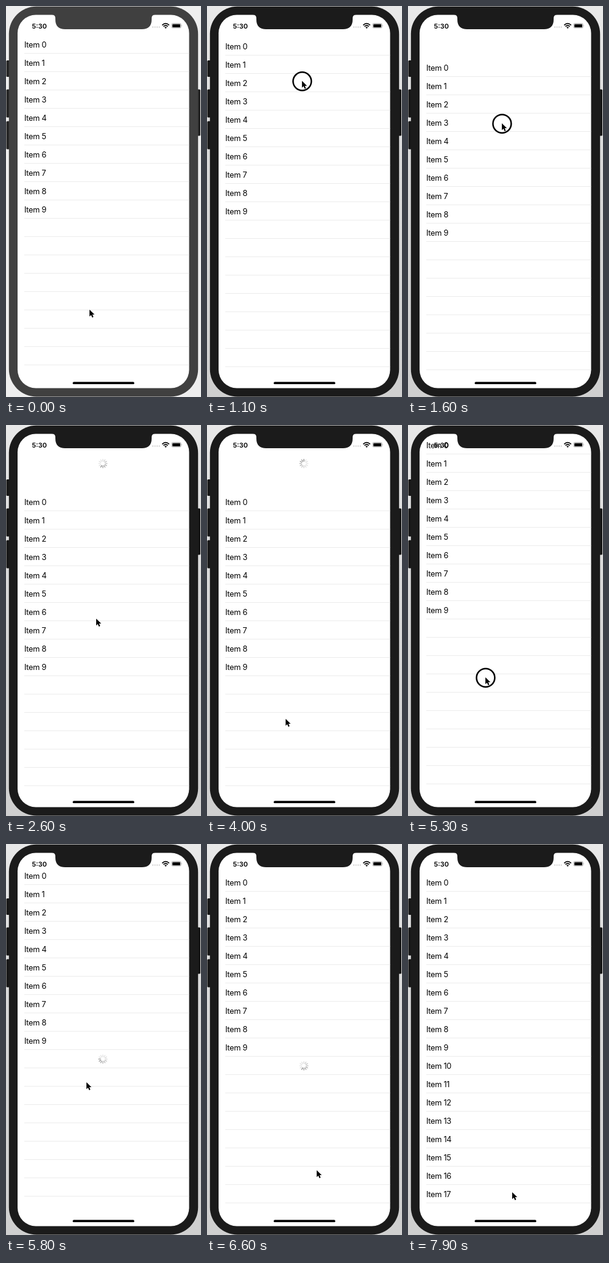
An HTML page for the animation above (8000 ms loop, 320 px wide and 640 px high).

```html
<!DOCTYPE html>
<html lang="en">
<head>
<meta charset="utf-8">
<title>Pull to refresh list</title>
<style>
  html, body { margin: 0; width: 100%; height: 100%; overflow: hidden; background: #eee; }
  svg { display: block; width: 320px; height: 640px; --body: #1b1b1b; --button: #171717; }
  svg.idle { --body: #404040; --button: #242424; }
  .body { fill: var(--body); }
  .button { fill: var(--button); }
  .idle .shade { opacity: 0; }
  text { font-family: Inter, "Liberation Sans", sans-serif; fill: #000; }
  .row { font-size: 12.8px; letter-spacing: -.3px; }
  .clock { font-size: 11px; font-weight: 600; }
  .line { stroke: #ececec; stroke-width: 1; }
</style>
</head>
<body>
<svg id="stage" viewBox="0 0 320 640">
  <defs>
    <clipPath id="screen"><rect x="19" y="14.5" width="281.5" height="611" rx="30"/></clipPath>
    <linearGradient id="shade" x2="0" y2="1">
      <stop offset="0" stop-color="#e8e8e8"/>
      <stop offset=".4" stop-color="#d9d9d9"/>
      <stop offset="1" stop-color="#cfcfcf"/>
    </linearGradient>
  </defs>
  <rect width="320" height="640" fill="#eeeeee"/>
  <rect class="shade" width="320" height="640" fill="url(#shade)"/>
  <g class="button">
    <rect x=".5" y="89" width="6" height="27" rx="1.5"/>
    <rect x=".5" y="136.500" width="6" height="46" rx="1.5"/>
    <rect x=".5" y="188.500" width="6" height="46" rx="1.5"/>
    <rect x="313" y="136.500" width="6" height="76" rx="1.5"/>
  </g>
  <rect class="body" x="4.800" y=".8" width="310.400" height="638.600" rx="45"/>
  <rect x="19" y="14.500" width="281.500" height="611" rx="30" fill="#fff"/>

  <g clip-path="url(#screen)">
    <g id="lines"></g>
    <g id="rows"></g>
    <g id="spinner"></g>
  </g>

  <path class="body" d="M75 14Q81 14.500 81 20V22Q81 38 97 38H223Q239 38 239 22V20Q239 14.500 245 14Z"/>
  <text class="clock" x="42.500" y="36.500">5:30</text>
  <g fill="#c4c4c4">
    <circle cx="241" cy="34.500" r="1"/><circle cx="244.500" cy="34.500" r="1"/>
    <circle cx="248" cy="34.500" r="1"/><circle cx="251.500" cy="34.500" r="1"/>
  </g>
  <g fill="none" stroke="#000" stroke-width="1.700">
    <path d="M256.300 31.300Q262 26 267.700 31.300"/>
    <path d="M258.500 33.500Q262 30.300 265.500 33.500"/>
  </g>
  <path d="M260 35Q262 33.300 264 35L262 37Z"/>
  <rect x="271.700" y="28.500" width="15.600" height="7.600" rx="2.200" fill="#fff" stroke="#999" stroke-width=".8"/>
  <rect x="273" y="29.700" width="13" height="5.200" rx="1"/>
  <path d="M288.500 31V33.600Q289.800 32.300 288.500 31Z" fill="#999"/>
  <rect x="109.500" y="615.300" width="101" height="3.700" rx="1.850"/>

  <g id="pointer">
    <circle id="touch" cx=".4" cy=".8" r="15" fill="#fff" stroke="#000" stroke-width="2.500"/>
    <path d="M0 0V11.200L2.600 8.800L4.500 13L6.500 12.100L4.700 8.100H8.200Z" stroke="#fff" stroke-width="1" paint-order="stroke"/>
  </g>
</svg>
<script>
const LOOP = 8000, STEP = 100, ROW = 30;
const $ = id => document.getElementById(id);

function add(parent, tag, attrs, label = "") {
  const node = document.createElementNS("http://www.w3.org/2000/svg", tag);
  for (const key in attrs) node.setAttribute(key, attrs[key]);
  node.textContent = label;
  parent.append(node);
  return node;
}

// [time, x, y]
const path = [
  [0, 137, 497], [200, 138, 490], [900, 156, 117], [1000, 156, 117],
  [1600, 154, 192], [2100, 149, 312], [2600, 148, 317], [3000, 146, 335],
  [4000, 129, 481], [4500, 127, 470], [4900, 127, 470], [5300, 127, 413],
  [5600, 129, 385], [5800, 132, 390], [6600, 180, 534], [7200, 178, 565],
  [7900, 171, 570]
];
// [time, list offset]
const scroll = [
  [0, 0], [1000, 0], [1600, 38], [2100, 91], [2200, 92], [2500, 63],
  [4300, 63], [4600, 0], [4900, 0], [5300, -30], [5600, -44], [5900, 0]
];
const presses = [[1000, 2200], [4900, 5600]];
const FOCUS = 1000, REFRESH = [2000, 4300], MORE = [5600, 7300];

const within = (t, [from, to]) => t >= from && t < to;

function sample(track, t) {
  const next = track.findIndex(key => key[0] > t);
  if (next < 0) return track[track.length - 1].slice(1);
  const a = track[next - 1], b = track[next];
  const p = (t - a[0]) / (b[0] - a[0]);
  const ease = p * p * (3 - 2 * p);
  return a.slice(1).map((v, i) => v + (b[i + 1] - v) * ease);
}

const lines = [], rows = [], spokes = [];
for (let i = 0; i < 20; i++)
  lines.push(add($("lines"), "line", { class: "line", x1: 30, x2: 300.5 }));
for (let i = 0; i < 18; i++)
  rows.push(add($("rows"), "text", { class: "row", x: 30, y: 67.5 + i * ROW }, "Item " + i));
for (let i = 0; i < 12; i++)
  spokes.push(add($("spinner"), "line", {
    y1: -3.8, y2: -7, stroke: "#777", "stroke-width": 1.2,
    "stroke-linecap": "round", transform: `rotate(${i * 30})`
  }));

const show = (node, on) => node.setAttribute("visibility", on ? "visible" : "hidden");
const move = (node, x, y) => node.setAttribute("transform", `translate(${x} ${y})`);

function draw(t) {
  const offset = Math.round(sample(scroll, t)[0]);
  $("stage").classList.toggle("idle", t < FOCUS);

  move($("rows"), 0, offset);
  rows.forEach((row, i) => show(row, i < 10 || t >= MORE[1]));
  lines.forEach((line, i) => {
    const y = 77.5 + i * ROW + offset;
    line.setAttribute("y1", y);
    line.setAttribute("y2", y);
    show(line, y < 600);
  });

  const refreshing = within(t, REFRESH);
  show($("spinner"), refreshing || within(t, MORE));
  move($("spinner"), 159, refreshing ? 63 : 363 + offset);
  const head = Math.floor(t * 12 / 1000);
  spokes.forEach((spoke, i) => {
    const age = ((head - i) % 12 + 12) % 12;
    spoke.setAttribute("opacity", Math.max(.25, 1 - age * .1));
  });

  move($("pointer"), ...sample(path, t));
  show($("touch"), presses.some(span => within(t, span)));
}

const start = performance.now();
function tick() {
  const t = (performance.now() - start) % LOOP;
  draw(Math.floor(t / STEP) * STEP);
  requestAnimationFrame(tick);
}
tick();
</script>
</body>
</html>
```
